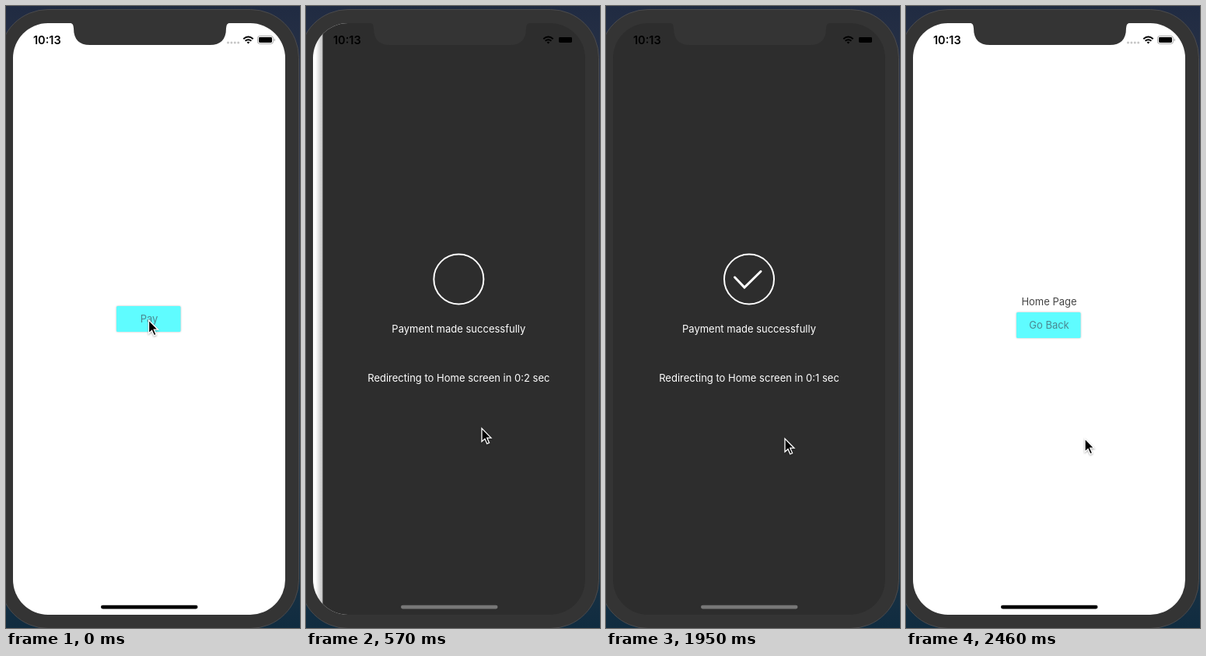
An HTML page that plays this animation: 378 by 798 pixels, repeating every 3300 ms.

```html
<!DOCTYPE html>
<html lang="en">
<head>
<meta charset="utf-8">
<title>Payment flow</title>
<style>
  html, body { margin: 0; width: 100%; height: 100%; overflow: hidden; background: #1d2940; }
  svg { display: block; width: 378px; height: 798px; }
  text { font: 13px Inter, "Liberation Sans", sans-serif; text-anchor: middle; }
  .clock { font-size: 14.5px; font-weight: 600; }
  .button { fill: #5ffcff; filter: drop-shadow(0 0 1px #0004); }
  .label { fill: #4b8790; }
  .faint { mix-blend-mode: darken; fill: none; }
</style>
</head>
<body>
<svg viewBox="0 0 378 798">
  <defs>
    <linearGradient id="desk" x2="0" y2="1">
      <stop stop-color="#202b42"/>
      <stop offset=".5" stop-color="#454a58"/>
      <stop offset="1" stop-color="#102c40"/>
    </linearGradient>
    <linearGradient id="edge">
      <stop stop-color="#000" stop-opacity="0"/>
      <stop offset="1" stop-color="#000" stop-opacity=".25"/>
    </linearGradient>
    <clipPath id="screen"><rect x="9" y="22" width="350" height="759" rx="45"/></clipPath>
    <clipPath id="darkPart"><rect id="darkSpan" y="760" height="20"/></clipPath>
  </defs>

  <rect width="378" height="798" fill="url(#desk)"/>
  <rect x="-8" y="4.5" width="384.5" height="794" rx="62" fill="#343434" stroke="#4b4b4d"/>

  <g clip-path="url(#screen)">
    <g id="pay">
      <rect x="9" y="22" width="350" height="759" fill="#fff"/>
      <rect class="button" x="142" y="385" width="82.5" height="33" rx="1.5"/>
      <text class="label" x="184" y="406">Pay</text>
    </g>
    <g id="done">
      <rect x="0" y="22" width="9" height="759" fill="url(#edge)"/>
      <rect x="9" y="22" width="350" height="759" fill="#2d2d2d"/>
      <g fill="none" stroke="#fff">
        <circle cx="184" cy="350.5" r="32" stroke-width="2"/>
        <path id="check" d="M165.5 348L178 361L199 340.5" pathLength="1" stroke-width="3"/>
      </g>
      <g fill="#fff">
        <text x="184" y="419">Payment made successfully</text>
        <text id="countdown" x="184" y="482"></text>
      </g>
    </g>
    <g id="home">
      <rect x="9" y="22" width="350" height="759" fill="#fff"/>
      <text x="184" y="384" fill="#444">Home Page</text>
      <rect class="button" x="142" y="393" width="82.5" height="33" rx="1.5"/>
      <text class="label" x="184" y="414">Go Back</text>
    </g>
  </g>

  <!-- notch and status bar -->
  <path d="M81 21.5q6 0 6 7q0 21.5 21 21.5H262q21 0 21-21.5q0-7 6-7z" fill="#343434"/>
  <text class="clock" x="52.8" y="48.7">10:13</text>
  <path class="faint" d="M285.5 47h15" stroke="#c6c6c6" stroke-width="3" stroke-linecap="round" stroke-dasharray="0 4.4"/>
  <g fill="none" stroke="#000" stroke-width="2">
    <path d="M305.3 42.2q6.2-5.4 12.4 0M307.6 44.8q3.9-3.2 7.8 0"/>
    <path d="M309.6 46.4q1.9-1.4 3.8 0L311.5 48.6z" fill="#000" stroke="none"/>
  </g>
  <rect class="faint" x="323.5" y="38.5" width="20" height="10" rx="2.8" stroke="#a6a6a6"/>
  <rect x="325" y="40" width="17" height="7" rx="1.4"/>
  <path class="faint" d="M345.3 42v3" stroke="#a6a6a6"/>

  <!-- home indicator: grey where the dark page lies below -->
  <rect x="122" y="768.8" width="124.5" height="4.6" rx="2.3"/>
  <g clip-path="url(#darkPart)">
    <rect x="121" y="767" width="126.5" height="8" fill="#2d2d2d"/>
    <rect x="122" y="768.8" width="124.5" height="4.6" rx="2.3" fill="#777"/>
  </g>

  <path id="cursor" d="M0 0V17l4-3.6l2.8 6.4l2.8-1.2l-2.8-6.4h5.2z" stroke="#fff" stroke-width="1.3" style="filter:drop-shadow(0 1px 1px #0005)"/>
</svg>
<script>
  const LOOP = 3300, STEP = 30, WIDTH = 350, LEFT = 9;
  const PUSH_DONE = 363.5, PUSH_HOME = 2161, TICK = 1290;
  const $ = id => document.getElementById(id);
  const ramp = (t, from, to) => Math.min(1, Math.max(0, (t - from) / (to - from)));
  const move = (id, x, y = 0) => $(id).setAttribute("transform", `translate(${x} ${y})`);
  const show = (id, on) => $(id).setAttribute("visibility", on ? "inherit" : "hidden");

  // critically damped spring, snapped to rest near its end
  function spring(t, start) {
    const u = Math.max(0, t - start) * 0.025;
    const p = 1 - (1 + u) * Math.exp(-u);
    return p > 0.993 ? 1 : p;
  }

  function draw(t) {
    const p = spring(t, PUSH_DONE), q = spring(t, PUSH_HOME);
    const doneX = WIDTH * (1 - p), homeX = WIDTH * (1 - q);
    move("pay", -WIDTH / 3 * p);
    move("done", doneX - WIDTH / 3 * q);
    move("home", homeX);
    show("pay", p < 1);
    show("done", p > 0 && q < 1);
    show("home", q > 0);

    $("darkSpan").setAttribute("x", LEFT + doneX);
    $("darkSpan").setAttribute("width", Math.max(0, homeX - doneX));

    const drawn = ramp(t, 690, 925);
    $("check").setAttribute("stroke-dasharray", `${drawn} 2`);
    $("check").setAttribute("stroke-linecap", drawn < 1 ? "butt" : "round");
    show("check", drawn > 0);
    $("countdown").textContent = `Redirecting to Home screen in 0:${t < TICK ? 2 : 1} sec`;

    const c = 1 - (1 - ramp(t, 330, 670)) ** 2;
    move("cursor", 183.5 + 46.5 * c, 403 + 152 * c);
  }

  const start = performance.now();
  function frame() {
    const t = (performance.now() - start) % LOOP;
    draw(Math.floor(t / STEP) * STEP);
    requestAnimationFrame(frame);
  }
  frame();
</script>
</body>
</html>
```
